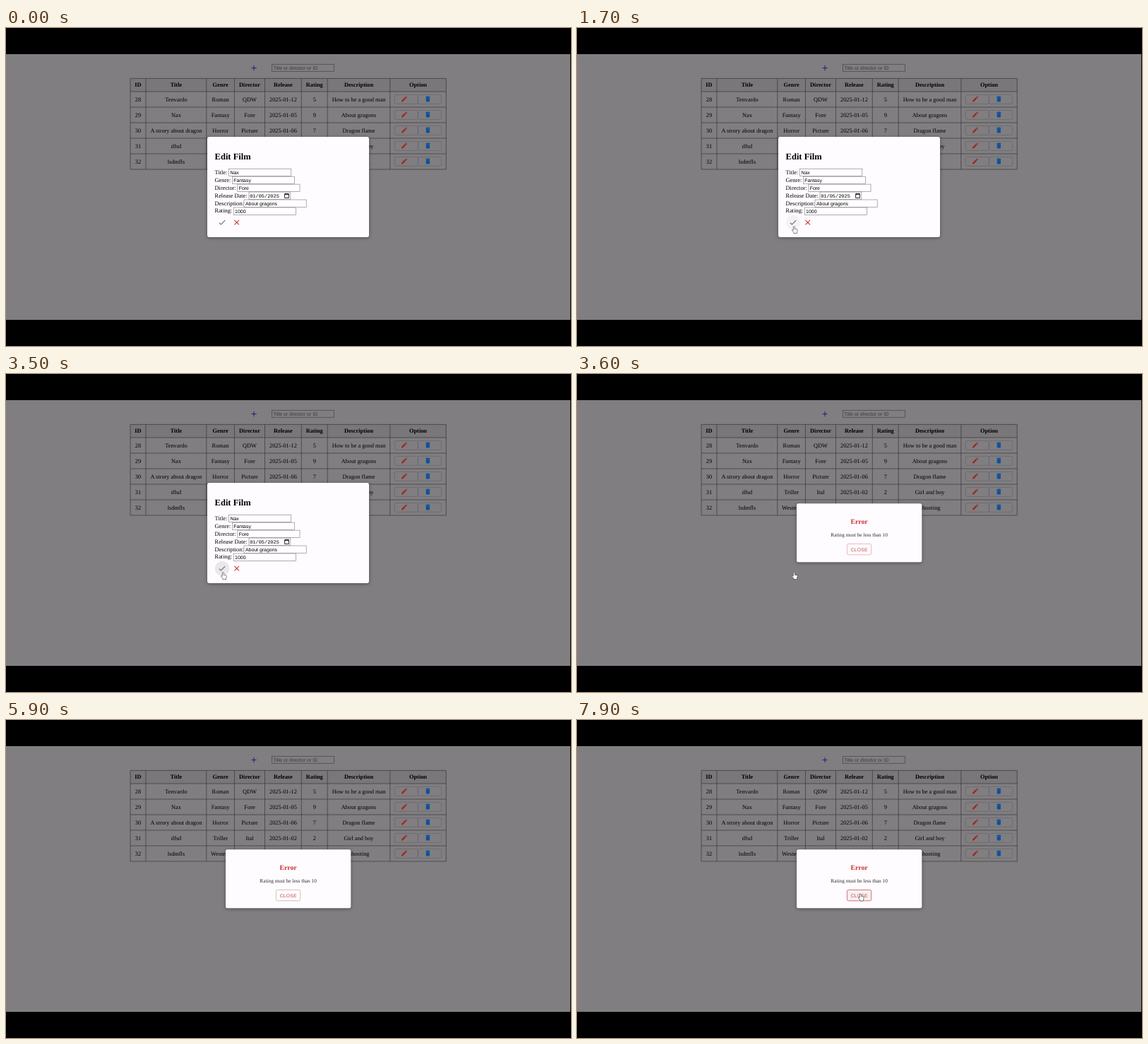
Animation, 800 px wide and 450 px high, one loop 8000 ms. Source, as an HTML page:

```html
<!DOCTYPE html>
<html lang="en">
<head>
<meta charset="utf-8">
<title>Film table</title>
<style>
  html, body { margin: 0; width: 100%; height: 100%; overflow: hidden; background: #000; }
  svg { display: block; width: 100vw; height: 100vh; }
  text { font: 8.33px "Liberation Serif", "Times New Roman", serif; text-rendering: geometricPrecision; white-space: pre; }
  .mid { text-anchor: middle; }
  .bold { font-weight: 700; }
  .field { font: 6.94px "Liberation Sans", Arial, sans-serif; }
  .date { font: 6.94px "Liberation Mono", monospace; }
  .box { fill: #fffdff; stroke: #7b797b; stroke-width: .6; }
  .panel { fill: #fffcff; filter: drop-shadow(0 1.5px 2.5px rgba(0, 0, 0, .4)); }
</style>
</head>
<body>
<svg viewBox="0 0 800 450">
  <defs>
    <path id="pencil" d="M3 17.25V21h3.75L17.81 9.94l-3.75-3.75zM20.71 7.04q.7-.7 0-1.41l-2.34-2.34q-.7-.6-1.41 0l-1.83 1.83 3.75 3.75z"/>
    <path id="trash" d="M6 19q0 2 2 2h8q2 0 2-2V7H6zM19 4h-3.5l-1-1h-5l-1 1H5v2h14z"/>
    <path id="plus" d="M19 13h-6v6h-2v-6H5v-2h6V5h2v6h6z"/>
    <path id="check" d="M9 16.17 4.83 12l-1.42 1.41L9 19 21 7l-1.41-1.41z"/>
    <path id="cross" d="M6.4 5 12 10.6 17.6 5 19 6.4 13.4 12l5.6 5.6-1.4 1.4-5.6-5.6L6.4 19 5 17.6l5.6-5.6L5 6.4z"/>
  </defs>
  <rect y="37" width="799" height="376" fill="#807e80"/>
  <g id="page"></g>
  <g id="edit">
    <rect class="panel" x="285" y="154" width="229" height="142" rx="3"/>
    <text class="bold" x="295.6" y="186" style="font-size:12.5px">Edit Film</text>
    <circle id="halo" cx="306" cy="275.2" r="10.4"/>
  </g>
  <g id="error">
    <rect class="panel" x="311" y="183.3" width="177.3" height="83" rx="2.5"/>
    <text class="mid bold" x="399.6" y="212.4" fill="#c5302f" style="font-size:9.75px">Error</text>
    <text class="mid" x="399.6" y="229.8" fill="#2c2a2c" style="font-size:7.3px">Rating must be less than 10</text>
    <rect id="close" x="382.4" y="240.4" width="34.2" height="15.4" rx="2" stroke-width=".8"/>
    <text class="mid" x="399.7" y="250.5" fill="#c64a4a" style="font:6.77px 'Liberation Sans',Arial,sans-serif;letter-spacing:.19px">CLOSE</text>
  </g>
  <g fill="#fff" stroke="#333" stroke-width=".6" stroke-linejoin="round">
    <path id="arrow" d="M0 0V8.6L2 6.8 3.3 9.8 4.6 9.2 3.3 6.3H6z"/>
    <path id="hand" d="M-1 .8Q-1 0 0 0T1 .8V3.6L4 4.2Q5 4.5 5 5.5L4.2 8V10H-.4V8.8L-2.8 5.8Q-2.8 4.6-1.6 5L-1 5.6z"/>
  </g>
</svg>
<script>
const $ = id => document.getElementById(id);

function add(parent, tag, attrs, text) {
  const el = document.createElementNS("http://www.w3.org/2000/svg", tag);
  for (const k in attrs) el.setAttribute(k, attrs[k]);
  if (text) el.textContent = text;
  $(parent).append(el);
}

function icon(parent, name, cx, cy, scale, fill) {
  add(parent, "use", {
    href: "#" + name, fill,
    transform: `translate(${cx} ${cy}) scale(${scale}) translate(-12 -12)`
  });
}

// Toolbar
icon("page", "plus", 351, 56.6, .52, "#32197c");
add("page", "rect", { x: 376.4, y: 51.3, width: 88, height: 10, fill: "none", stroke: "#464446", "stroke-width": .7 });
add("page", "text", { class: "field", x: 378.2, y: 58.8, fill: "#3b393b" }, "Title or director or ID");

// Table
const edges = [176, 198, 283.8, 323.5, 366.5, 418.3, 455.2, 543.8, 623.2];
const rows = [
  "ID|Title|Genre|Director|Release|Rating|Description|Option",
  "28|Tenvardo|Roman|QDW|2025-01-12|5|How to be a good man",
  "29|Nax|Fantasy|Fore|2025-01-05|9|About gragons",
  "30|A strory about dragon|Horror|Picture|2025-01-06|7|Dragon flame",
  "31|dfsd|Triller|Ital|2025-01-02|2|Girl and boy",
  "32|lsdmfls|Western||||Shooting"
];
const left = edges[0], right = edges[8], top0 = 71.4;
const rowTop = i => i ? 68 + 22 * i : top0;

add("page", "rect", { x: left, y: top0, width: right - left, height: rowTop(1) - top0, fill: "#797779" });
let grid = "";
for (const x of edges) grid += `M${x} ${top0}V${rowTop(6)}`;
for (let i = 0; i <= 6; i++) grid += `M${left} ${rowTop(i)}H${right}`;
add("page", "path", { d: grid, fill: "none", stroke: "#343234", "stroke-width": .65 });

rows.forEach((row, i) => {
  const mid = (rowTop(i) + rowTop(i + 1)) / 2;
  row.split("|").forEach((label, c) => add("page", "text", {
    class: i ? "mid" : "mid bold", x: (edges[c] + edges[c + 1]) / 2, y: mid + 2.7
  }, label));
  if (!i) return;
  const button = (x, name, ink, line) => {
    add("page", "rect", { x, y: mid - 6.6, width: 33, height: 13, rx: 2, fill: "none", stroke: line, "stroke-width": .6 });
    icon("page", name, x + 13.7, mid - .5, .434, ink);
  };
  button(550.3, "pencil", "#a3241f", "#6b5d60");
  button(583.6, "trash", "#10509a", "#5b6672");
});

// Edit form
const fields = [
  ["Title: ", "Nax", 315.6],
  ["Genre: ", "Fantasy", 320.3],
  ["Director: ", "Fore", 327.8],
  ["Release Date: ", "01/05/2025", 344],
  ["Description:", "About gragons", 337],
  ["Rating: ", "1000", 322.2]
];
fields.forEach(([label, value, x], i) => {
  const y = 199.2 + 10.95 * i, date = i === 3;
  add("edit", "text", { x: 295.6, y: y + 7.5 }, label);
  add("edit", "rect", { class: "box", x, y, width: date ? 58.8 : 88.2, height: 10.4 });
  add("edit", "text", { class: date ? "date" : "field", x: x + (date ? 1.2 : 1.9), y: y + 7.6 }, value);
  if (date) add("edit", "path", {
    d: `M394.6 ${y + 2.6}h5.8v5.8h-5.8zm0 1h5.8M396 ${y + 1.6}v1m3-1v1`,
    fill: "none", stroke: "#111", "stroke-width": .9
  });
});
icon("edit", "check", 305.9, 275.2, .52, "#696769");
icon("edit", "cross", 326.7, 275.2, .52, "#c9302f");

// Pointer paths: [time, x, y]
const paths = [
  [[100, 338, 262], [500, 307.3, 280.6], [5200, 307.3, 280.6]],
  [[6500, 440, 250], [6900, 402, 233.5], [7000, 402, 233.5], [7100, 401, 240], [7400, 401.3, 246], [8000, 401.3, 246]]
];

function pointerAt(t) {
  for (const p of paths)
    for (let i = 1; i < p.length; i++) {
      const [t0, x0, y0] = p[i - 1], [t1, x1, y1] = p[i];
      if (t < t0 || t >= t1) continue;
      const k = (t - t0) / (t1 - t0);
      return [x0 + (x1 - x0) * k, y0 + (y1 - y0) * k];
    }
  return null;
}

const show = (id, on) => $(id).setAttribute("visibility", on ? "visible" : "hidden");

function draw(now) {
  const t = Math.floor(now % 8000 / 100) * 100;
  const failed = t >= 3600, over = t >= 7300;
  show("edit", !failed);
  show("error", failed);

  const halo = t < 500 ? 0 : t < 3000 ? .04 : Math.min(.08, .05 + (t - 3000) / 10000);
  $("halo").setAttribute("fill-opacity", halo);

  $("close").setAttribute("fill", over ? "#f5f0f2" : "#fffcff");
  $("close").setAttribute("stroke", over ? "#cb5654" : t < 3800 ? "#e5a9aa" : "#c9b0b0");

  const at = pointerAt(t);
  const hand = t >= 400 && t < 5200 || over;
  show("arrow", at && !hand);
  show("hand", at && hand);
  if (at) $(hand ? "hand" : "arrow").setAttribute("transform", `translate(${at})`);
}

const start = performance.now();
function tick() {
  draw(performance.now() - start);
  requestAnimationFrame(tick);
}
tick();
</script>
</body>
</html>
```
